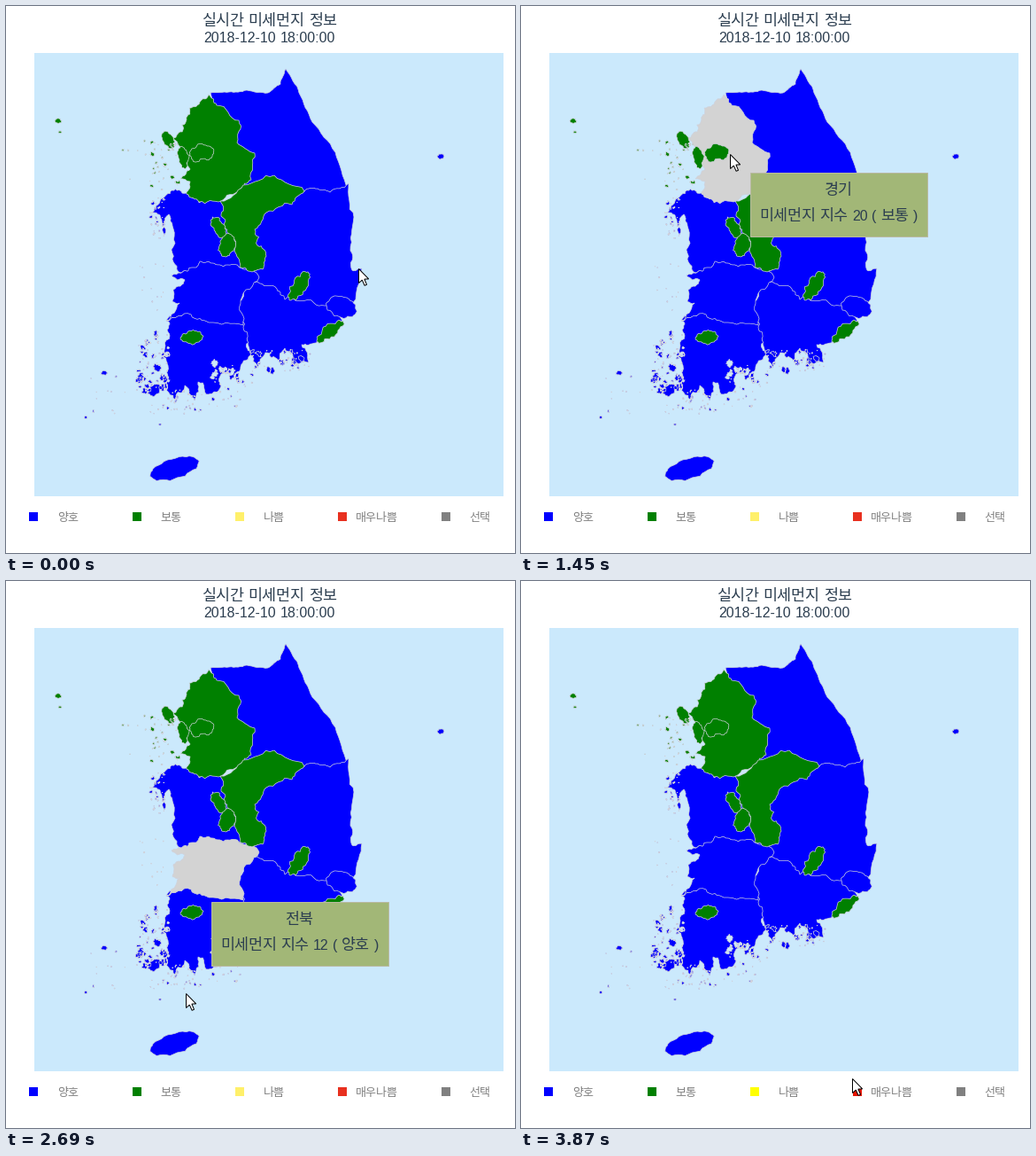
Animation of 575x617 px, one loop 3.94 s. Source, as a matplotlib script:

```python
import itertools
import math

import matplotlib.pyplot as plt
import numpy as np
from matplotlib.animation import FuncAnimation
from matplotlib.patches import PathPatch, Polygon, Rectangle
from matplotlib.path import Path

W, H, DPI = 575, 617, 64
PT = 72 / DPI            # points per pixel
LOOP, STEP, LAG = 3940, 20, 80

BLUE, GREEN, SEA = '#0000ff', '#008000', '#cbe9fc'
HOVER, BORDER = '#d3d3d3', '#cfd2dc'
INK, MUTED = '#2c3e50', '#828282'
TIP_FILL, TIP_EDGE = '#a2b777', '#b9b9a2'

rng = np.random.default_rng(11)
fig = plt.figure(figsize=(W / DPI, H / DPI), dpi=DPI, facecolor='white')
ax = fig.add_axes([0, 0, 1, 1])
ax.set_xlim(0, W)
ax.set_ylim(H, 0)
ax.axis('off')


# ---------- text ----------
NARROW = {' ': .278, ':': .278, '(': .333, ')': .333, '-': .333}


def kind(ch):
    return 'space' if ch == ' ' else 'hangul' if ch >= '가' else 'latin'


def advance(text, size):
    return size * sum(1 if kind(c) == 'hangul' else NARROW.get(c, .556) for c in text)


def label(cx, base, text, size, color, z=5):
    """Centred line of mixed Korean and Latin runs."""
    x, made = cx - advance(text, size) / 2, []
    for k, group in itertools.groupby(text, kind):
        run = ''.join(group)
        if k != 'space':
            family = 'Noto Sans CJK JP' if k == 'hangul' else 'Liberation Sans'
            px = size / .92 if k == 'hangul' else size
            made.append(ax.text(x, base, run, family=family, size=px * PT,
                                color=color, va='baseline', ha='left', zorder=z))
        x += advance(run, size)
    return made


# ---------- map ----------
def rough(points, amp, rounds=3):
    """Closed fractal outline through a few key points."""
    pts = np.array(points, float)
    for _ in range(rounds):
        d = np.roll(pts, -1, axis=0) - pts
        length = np.hypot(*d.T)
        push = amp * rng.normal(size=len(pts)).clip(-1.6, 1.6) * np.minimum(1, 14 / length)
        mid = pts + d / 2 + np.column_stack([-d[:, 1], d[:, 0]]) * push[:, None]
        pts = np.stack([pts, mid], axis=1).reshape(-1, 2)
    return pts


def oval(x, y, a, b, tilt=0, amp=.16):
    """Ragged ellipse with its long axis turned by tilt degrees."""
    n = 10 if a > 5 else 6
    t, c = np.arange(n) * 2 * math.pi / n, math.radians(tilt)
    u, v = a * np.cos(t), b * np.sin(t)
    ring = np.column_stack([x + u * math.cos(c) - v * math.sin(c),
                            y + u * math.sin(c) + v * math.cos(c)])
    return rough(ring, amp, 2)


def islets(n, x, y, dx, dy, big):
    """Seeded swarm of islands, most of them tiny."""
    sizes = .4 + big * rng.random(n) ** 2.5
    return [oval(x + dx * rng.uniform(-1, 1), y + dy * rng.uniform(-1, 1),
                 r, .7 * r, rng.uniform(0, 180), .3) for r in sizes]


def grade(value):
    return ('양호', BLUE) if value <= 15 else ('보통', GREEN)


regions = {}


def region(name, value, main, islands=()):
    loops = [np.vstack([p, p[:1]]) for p in (main, *islands)]
    path = Path.make_compound_path(*[Path(p, closed=True) for p in loops])
    patch = PathPatch(path, fc=grade(value)[1], ec=BORDER, lw=.7 * PT, zorder=2)
    ax.add_patch(patch)
    regions[name] = (patch, Path(loops[0]), value)


ax.add_patch(Rectangle((32, 53), 530, 500, fc=SEA, ec='none', zorder=1))

# Later regions cover the loose inner edges of earlier ones.
region('강원', 11, rough([
    (231, 98), (252, 97), (272, 95), (296, 98), (310, 88), (316, 71), (331, 98),
    (346, 131), (372, 165), (387, 206), (300, 222), (262, 215), (235, 150)], .06))

region('경북', 14, rough([
    (337, 209), (352, 206), (366, 210), (387, 200), (393, 238), (389, 276),
    (391, 298), (402, 296), (395, 331), (384, 340), (290, 340), (262, 304),
    (275, 230), (312, 214)], .1), [oval(491, 169.5, 4, 3)])

region('경남', 13, rough([
    (284, 311), (306, 319), (315, 331), (348, 335), (372, 338), (380, 355),
    (350, 380), (334, 382), (342, 402), (326, 403), (315, 386), (308, 400),
    (293, 391), (284, 408), (276, 392), (255, 350), (268, 318)], .17),
    islets(45, 312, 400, 34, 12, 4))

region('전남', 10, rough([
    (181, 355), (185, 372), (177, 395), (181, 425), (192, 444), (202, 428),
    (213, 445), (217, 424), (229, 438), (240, 434), (246, 414), (254, 422),
    (265, 407), (277, 392), (274, 380), (268, 362), (255, 345), (200, 343)], .2),
    [oval(168, 433, 9, 6, -30), oval(111, 414, 4, 2.5), oval(90, 464, 2, 1.5)]
    + islets(70, 166, 403, 18, 33, 5) + islets(45, 222, 446, 44, 14, 2.2)
    + islets(26, 256, 416, 24, 14, 5) + islets(22, 140, 435, 45, 26, 1.2))

region('전북', 12, rough([
    (198, 301), (187, 304), (202, 309), (189, 320), (188, 333), (196, 335),
    (181, 355), (209, 348), (229, 357), (268, 360), (265, 332), (286, 306),
    (270, 290), (222, 280)], .13), islets(12, 168, 315, 17, 28, 1))

region('충남', 14, rough([
    (187, 208), (204, 211), (218, 222), (238, 212), (256, 228), (262, 275),
    (272, 297), (250, 292), (233, 290), (219, 288), (210, 295), (198, 301),
    (188, 279), (188, 248), (184, 235), (179, 258), (174, 236), (162, 233),
    (175, 217)], .14), islets(30, 171, 240, 8, 24, 2))

region('경기', 20, rough([
    (229, 100), (238, 112), (263, 129), (261, 154), (281, 166), (277, 196),
    (264, 207), (243, 220), (218, 221), (204, 212), (208, 198), (197, 195),
    (208, 184), (204, 165), (189, 150), (199, 142), (204, 128), (207, 115),
    (220, 107)], .13))

region('충북', 18, rough([
    (242, 220), (268, 202), (303, 191), (337, 209), (323, 224), (294, 233),
    (281, 252), (284, 270), (294, 282), (290, 297), (278, 300), (264, 294),
    (258, 276), (256, 260), (247, 250), (243, 237)], .14))

region('세종', 19, oval(240, 250, 14, 6, 60))
region('대전', 17, oval(250, 270, 13, 9, -75))
region('대구', 16, oval(331, 316, 19, 9, -58))
region('울산', 12, oval(379, 340, 18, 12, 15, .1))
region('부산', 18, oval(366, 367, 19, 7, -38))
region('광주', 17, oval(210, 373.5, 13, 7, -5))
region('인천', 19, oval(200, 171, 13, 5.5, 80),
       [oval(183, 151, 11, 6, 65), oval(59, 129.5, 4, 2.5), oval(61, 142, 2, 1.5)]
       + islets(36, 178, 178, 16, 30, 3) + islets(6, 148, 175, 18, 24, 1))
region('서울', 17, oval(221, 166, 14, 9, -10))
region('제주', 7, oval(190.5, 522, 29, 12, -17, .07), [oval(174, 472, 1.6, 1)])

# ---------- title and legend ----------
label(297.5, 22, '실시간 미세먼지 정보', 16, INK)
label(297.5, 41, '2018-12-10 18:00:00', 16, INK)

LEGEND = {'양호': BLUE, '보통': GREEN, '나쁨': '#fff06a',
          '매우나쁨': '#e8301f', '선택': '#808080'}
keys = {}
for i, (word, color) in enumerate(LEGEND.items()):
    keys[word] = ax.add_patch(Rectangle((int(26.7 + 116.4 * i), 571), 10, 10,
                                        fc=color, ec='none', zorder=4))
    label(70 + 116.25 * i, 580.5, word, 12, MUTED)

# ---------- motion ----------
# Spans in which the screen refreshes about every 76 ms; it holds in between.
SPANS = [(0, 0), (80, 530), (610, 610), (990, 1450), (1530, 1760),
         (2160, 2620), (2690, 3150), (3300, 3300), (3630, 3870)]
TICKS = np.concatenate([np.round(np.linspace(a, b, round((b - a) / 76) + 1), -1)
                        for a, b in SPANS])

# Stops of the pointer: time, x, y
STOPS = np.array([
    (0, 398, 296), (80, 385, 275), (250, 343, 275), (450, 341, 275), (530, 277, 266),
    (980, 277, 266), (1060, 277, 232), (1140, 250, 191), (1370, 238, 167),
    (1450, 236, 167), (1680, 216, 168), (2230, 216, 169), (2310, 211, 281),
    (2610, 211, 341), (2690, 203, 465), (3220, 195, 517), (3550, 195, 517),
    (3630, 214, 521), (3870, 374, 561)])

ARROW = np.array([(0, 0), (0, 16), (3.8, 12.6), (6.6, 18.8), (9, 17.8),
                  (6.4, 11.6), (11.2, 11.4)])

box = ax.add_patch(Rectangle((0, 0), 201, 72, fc=TIP_FILL, ec=TIP_EDGE, lw=PT, zorder=10))
arrow = ax.add_patch(Polygon(ARROW, closed=True, fc='white', ec='black', lw=PT, zorder=20))
tip_text = []


def pointer(t):
    return np.array([np.interp(t % LOOP, STOPS[:, 0], STOPS[:, i]) for i in (1, 2)])


def draw(i):
    t = i * STEP + STEP / 2
    t = TICKS[TICKS <= t][-1]
    arrow.set_xy(ARROW + pointer(t) + .5)

    # The map reacts to where the pointer was a moment ago.
    seen = pointer(t - LAG)
    name = next((k for k in reversed(regions) if regions[k][1].contains_point(seen)), None)
    for k, (patch, _, value) in regions.items():
        patch.set_facecolor(HOVER if k == name else grade(value)[1])

    vivid = t >= 3630
    keys['나쁨'].set_facecolor('#ffff00' if vivid else LEGEND['나쁨'])
    keys['매우나쁨'].set_facecolor('#e61400' if vivid else LEGEND['매우나쁨'])

    while tip_text:
        tip_text.pop().remove()
    box.set_visible(name is not None)
    if name:
        value = regions[name][2]
        line = f'미세먼지 지수 {value} ( {grade(value)[0]} )'
        width = round(advance(line, 16) + 21)
        x, y = np.round(seen) + 20
        if x + width > W:
            x -= width + 40
        box.set_bounds(x + .5, y + .5, width, 72)
        mid = x + width / 2 + .5
        tip_text.extend(label(mid, y + 26, name, 16, INK, 11))
        tip_text.extend(label(mid, y + 55, line, 16, INK, 11))
    return []


anim = FuncAnimation(fig, draw, frames=LOOP // STEP, interval=STEP,
                     repeat=True, repeat_delay=0, blit=False, cache_frame_data=False)
plt.show()
```
